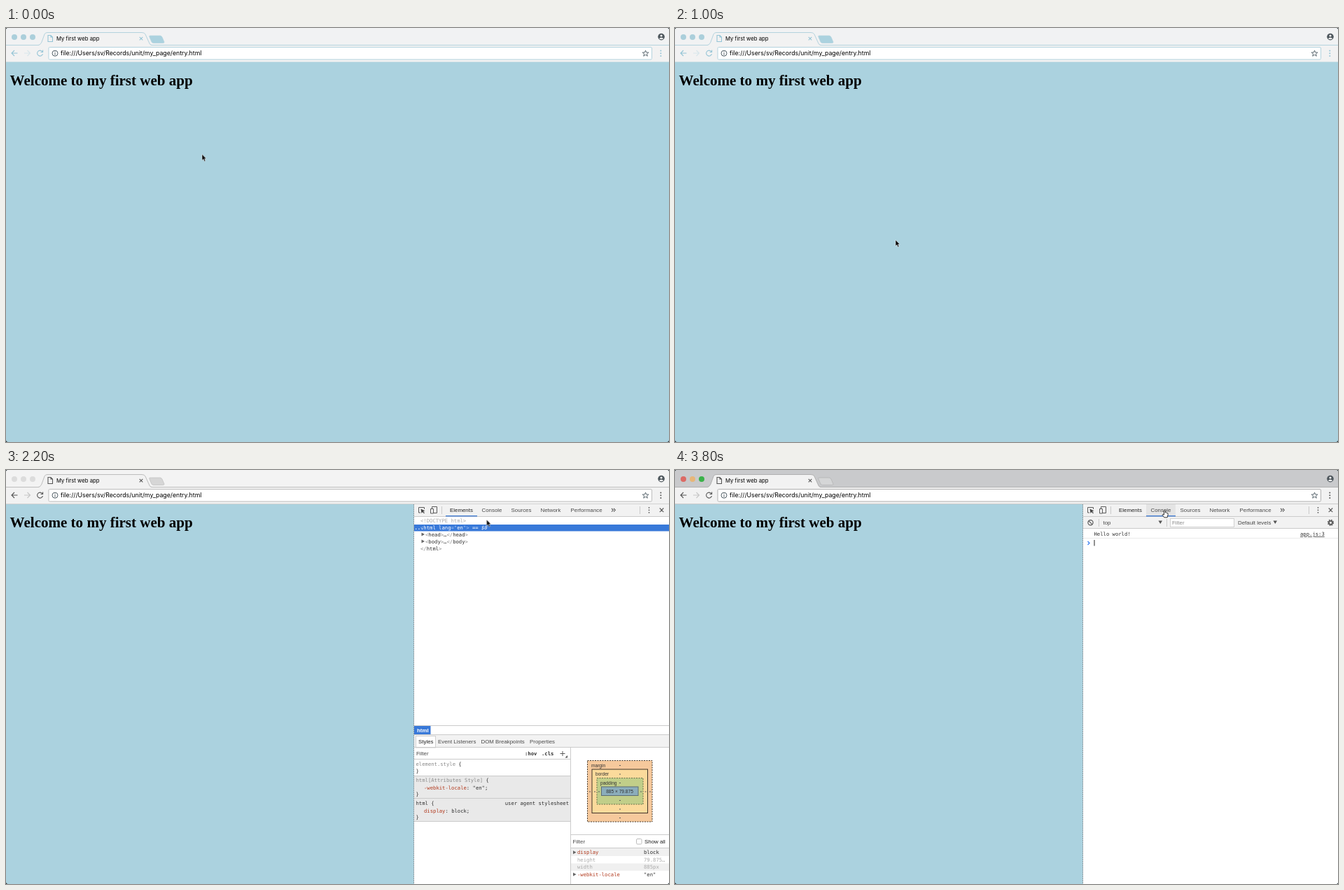
Animation of 947 by 592 pixels, one loop 4000 ms. Source, as an HTML page:

```html
<!DOCTYPE html>
<html lang="en">
<head>
<meta charset="utf-8">
<title>My first web app</title>
<style>
html, body { margin: 0; width: 100%; height: 100%; overflow: hidden; background: #111; }
svg { display: block; width: 947px; height: 592px; border-radius: 3px; }
text { white-space: pre; }
.ui { font-family: Inter, Roboto, sans-serif; }
.sans { font: 7.9px "Liberation Sans", Arial, sans-serif; fill: #4a4a4a; }
.mono { font: 7.23px "DejaVu Sans Mono", monospace; fill: #303030; }
.tiny { font: 6.6px "Liberation Sans", Arial, sans-serif; fill: #333; }
.h1 { font: bold 21.04px "Liberation Serif", Times, serif; }
.soft { fill: #8c8c8c; }
.faint { fill: #a9a9a9; }
.prop { fill: #b23a1e; }
.dark { fill: #222; }
.bold { font-weight: bold; }
.mid { text-anchor: middle; }
.end { text-anchor: end; }
.rule { stroke: #cbcbcb; fill: none; }
.line { fill: none; stroke: #5a5a5a; }
.icon { fill: none; stroke: var(--icon); stroke-width: 1.1; }

/* every change is a hard cut on a 200 ms grid: 5% of the loop */
#stage, .anim { animation: 4s step-end infinite; }
#stage { animation-name: theme; }
#menu { animation-name: menu; }
#pickA { animation-name: pickA; }
#pickB { animation-name: pickB; }
#tools { animation-name: tools; }
#overlay { animation-name: overlay; }
#elements { animation-name: elements; }
#console, #hand { animation-name: console; }
#caret { animation-name: caret; }
#arrow { animation-name: arrow; }

@keyframes theme {
  0%, 25% { --icon: #94c4d6; --edge: #b4d3de; --strip: #f1f2f3; --plus: #abd2df;
    --red: #abcfdb; --amber: #abcfdb; --green: #abcfdb; }
  10% { --icon: #4c6977; --edge: #b4d3de; --strip: #f1f2f3; --plus: #abd2df;
    --red: #abcfdb; --amber: #abcfdb; --green: #abcfdb; }
  30% { --icon: #555; --edge: #bdbdbd; --strip: #f3f3f3; --plus: #d6d6d6;
    --red: #dcdcdc; --amber: #dcdcdc; --green: #dcdcdc; }
  70%, 100% { --icon: #555; --edge: #b0b0b0; --strip: #c9cacc; --plus: #d5d6d7;
    --red: #dc6a64; --amber: #e7b679; --green: #3bb24a; }
}
@keyframes menu { 0%, 25%, 100% { opacity: 0 } 5% { opacity: 1 } }
@keyframes pickA { 0%, 15%, 100% { opacity: 0 } 10% { opacity: 1 } }
@keyframes pickB { 0%, 25%, 100% { opacity: 0 } 15% { opacity: 1 } }
@keyframes tools { 0% { opacity: 0 } 30%, 100% { opacity: 1 } }
@keyframes overlay { 0%, 40%, 100% { opacity: 0 } 30% { opacity: 1 } }
@keyframes elements { 0%, 75%, 100% { opacity: 0 } 30% { opacity: 1 } }
@keyframes console { 0% { opacity: 0 } 75%, 100% { opacity: 1 } }
@keyframes caret { 0% { opacity: 0 } 90%, 100% { opacity: 1 } }
@keyframes arrow {
  0% { transform: translate(280px, 180.5px) }
  10% { transform: translate(307px, 266px) }
  15% { transform: translate(313px, 302px) }
  20% { transform: translate(316px, 305px) }
  25% { transform: translate(315px, 303px) }
  35% { transform: translate(380px, 276px) }
  40% { transform: translate(560px, 180px) }
  45% { transform: translate(645px, 118px) }
  50% { transform: translate(680px, 84px) }
  55% { transform: translate(686.5px, 71px) }
  60% { transform: translate(695px, 60px) }
  65% { transform: translate(698.5px, 56.5px); opacity: 1 }
  75%, 100% { transform: translate(698.5px, 56.5px); opacity: 0 }
}
</style>
</head>
<body>
<svg id="stage" viewBox="0 0 947 592">
  <!-- page -->
  <rect width="947" height="592" fill="#abd2df"/>
  <text class="h1" x="5.6" y="82">Welcome to my first web app</text>

  <!-- browser frame -->
  <g class="ui">
    <rect width="947" height="25" fill="var(--strip)"/>
    <rect y="24" width="947" height="25" fill="#f2f2f2"/>
    <path d="M0 24.5H947" stroke="var(--edge)"/>
    <path d="M46 25C49 24 50 22 51 20L55 9Q56 6.5 59 6.5H194Q198 6.5 199 9L204 20Q205 24 208 25Z" fill="#f2f2f2"/>
    <path d="M46 24.5C49 24 50 22 51 20L55 9Q56 6.5 59 6.5H194Q198 6.5 199 9L204 20Q205 24 208 24.5" fill="none" stroke="var(--edge)"/>
    <path d="M206 11H220Q222 11 223 13L226 20Q226 21.500 224.500 21.500H211Q209 21.500 208 20L205 13Q204 11 206 11Z" fill="var(--plus)" stroke="var(--edge)" stroke-width=".7"/>
    <circle cx="12" cy="13" r="4" fill="var(--red)"/>
    <circle cx="25" cy="13" r="4" fill="var(--amber)"/>
    <circle cx="38" cy="13" r="4" fill="var(--green)"/>
    <path class="icon" d="M60 10.500H64L66.500 13V19.500H60ZM64 10.500V13H66.500" stroke-width=".9"/>
    <text x="72" y="17.800" font-size="7.76">My first web app</text>
    <path class="icon" d="M190.700 12.800L195.300 17.400M195.300 12.800L190.700 17.400"/>
    <circle cx="936" cy="12.600" r="4.800" fill="#4d565c"/>
    <circle cx="936" cy="11" r="1.600" fill="#f2f2f2"/>
    <path d="M932.800 15.200Q936 12.500 939.200 15.200Q936 17.500 932.800 15.200Z" fill="#f2f2f2"/>

    <path class="icon" d="M16.500 36H8M12 32L8 36L12 40"/>
    <path class="icon" d="M26 36H34.500M30.500 32L34.500 36L30.500 40" opacity=".28"/>
    <path class="icon" d="M51.800 33.600A4 4 0 1 0 52.500 37.200M52.600 31.500V34.500H49.600"/>
    <rect x="61" y="27.500" width="861.500" height="17.500" rx="1.500" fill="#fff" stroke="var(--edge)"/>
    <g fill="none" stroke="#4f5d65">
      <circle cx="70" cy="36.200" r="4"/>
      <path d="M70 35.500V38.600M70 33.600V34.600"/>
      <path d="M913.500 32L914.700 35H917.900L915.400 37L916.300 40.200L913.500 38.400L910.700 40.200L911.600 37L909.100 35H912.300Z" stroke-width=".9"/>
    </g>
    <text x="78" y="39.400" font-size="8.770">file:///Users/sv/Records/unit/my_page/entry.html</text>
    <g fill="var(--icon)">
      <circle cx="935.300" cy="32.400" r="1"/><circle cx="935.300" cy="36.200" r="1"/><circle cx="935.300" cy="40" r="1"/>
    </g>
    <path d="M0 48.500H947" stroke="var(--edge)" opacity=".6"/>
  </g>

  <!-- context menu -->
  <g id="menu" class="anim ui" font-size="8.800" fill="#25343c">
    <rect x="284" y="300" width="102" height="13.300" rx="3" fill="#6d8d99"/>
    <rect x="280" y="178.500" width="110" height="133.500" rx="3" fill="#f1f2f3"/>
    <path d="M280 222.500H390M280 280H390" stroke="#c0d9e2"/>
    <text x="294" y="190">Back</text>
    <text x="294" y="202.500" fill="#a3cadb">Forward</text>
    <text x="294" y="215">Reload</text>
    <text x="294" y="235.300">Save As...</text>
    <text x="294" y="247.800">Print...</text>
    <text x="294" y="260.300">Cast...</text>
    <text x="294" y="272.900">Translate to English</text>
    <text x="294" y="293.300">View Page Source</text>
    <text x="294" y="305.800">Inspect</text>
    <g id="pickA" class="anim" fill="#fff">
      <rect x="280" y="263.800" width="110" height="12.700" fill="#0b69dc"/>
      <text x="294" y="272.900">Translate to English</text>
    </g>
    <g id="pickB" class="anim" fill="#fff">
      <rect x="280" y="296.700" width="110" height="12.700" fill="#0b69dc"/>
      <text x="294" y="305.800">Inspect</text>
    </g>
  </g>

  <!-- element highlight -->
  <g id="overlay" class="anim">
    <rect y="49" width="582" height="52" fill="#6fa8dc" opacity=".66"/>
    <path d="M6 108L12 102.500L18 108Z" fill="#333b42"/>
    <rect x="1" y="107" width="79" height="16" rx="2" fill="#333b42"/>
    <path d="M28.500 110.500V119.500" stroke="#727a80"/>
    <text class="mono bold" x="6" y="117.300" style="fill:#e3a4a4">html</text>
    <text class="mono bold" x="33" y="117.300" style="fill:#f2f2f2">885<tspan dx="1.500">×</tspan><tspan dx="1.500">79.88</tspan></text>
  </g>

  <!-- inspector -->
  <g id="tools" class="anim">
    <rect x="583" y="49" width="364" height="543" fill="#fff"/>
    <path d="M582.500 49V592" stroke="#929a9e" stroke-dasharray="2 1"/>
    <rect x="583" y="49" width="364" height="17.500" fill="#f2f2f2"/>
    <path class="rule" d="M583 66.500H947M622.500 52V63M905.500 52V63"/>
    <path class="line" d="M592 61H589.500V53.500H597.500V56"/>
    <path d="M592.500 55.500L598.500 58.500L596 59.200L598 61.500L597 62.300L595 60L593.500 62Z" fill="#444"/>
    <path class="line" d="M608.500 55V52.500H615.500V61.500H611M606.500 55.500H610.500V62H606.500Z"/>
    <g id="console" class="anim">
      <rect x="673" y="49" width="42" height="17" fill="#e4e4e4"/>
      <rect x="673" y="65" width="42" height="1.500" fill="#4b82d4"/>
      <rect x="583" y="67" width="364" height="16.500" fill="#f2f2f2"/>
      <path class="rule" d="M583 83.500H947M605.500 70V81M702.500 70V81"/>
      <circle class="line" cx="593.500" cy="75.300" r="3.600" stroke-width="1.200"/>
      <path class="line" d="M591 72.800L596 77.800" stroke-width="1.200"/>
      <rect x="707.500" y="69.500" width="91" height="12" fill="#fff" stroke="#d0d0d0"/>
      <g class="sans">
        <text x="611.500" y="77.800">top</text>
        <text class="soft" x="710" y="78.200">Filter</text>
        <text x="804" y="77.800">Default levels</text>
      </g>
      <path d="M690.500 72.500H696L693.250 77ZM854.500 72.500H860L857.250 77Z" fill="#555"/>
      <circle class="line" cx="936.500" cy="75.300" r="3.700" stroke-width="1.800" stroke-dasharray="1.700 1.206"/>
      <circle class="line" cx="936.500" cy="75.300" r="2.500" stroke-width="1.800"/>
      <text class="mono" x="598.500" y="94.300">Hello world!</text>
      <text class="mono" x="893" y="94.300" text-decoration="underline">app.js:3</text>
      <path d="M583 97.500H947" stroke="#ebebeb"/>
      <path d="M589.500 102L592 104.500L589.500 107" fill="none" stroke="#367cf1" stroke-width="1.200"/>
      <rect id="caret" class="anim" x="598.500" y="100" width="1" height="8.500" fill="#222"/>
    </g>
    <g class="sans">
      <text class="dark" x="634" y="60">Elements</text>
      <text x="679.500" y="60">Console</text>
      <text x="721.500" y="60">Sources</text>
      <text x="763.500" y="60">Network</text>
      <text x="806.500" y="60">Performance</text>
    </g>
    <path class="line" d="M865 55L867.300 57.300L865 59.600M868 55L870.300 57.300L868 59.600M933.700 54.500L939.300 60.100M939.300 54.500L933.700 60.100" stroke-width="1.100"/>
    <path d="M918.500 53.800V61.500" stroke="#555" stroke-width="1.800" stroke-linecap="round" stroke-dasharray="0 3.500"/>

    <g id="elements" class="anim">
      <rect x="628" y="65" width="45" height="1.500" fill="#4b82d4"/>
      <!-- tree -->
      <rect x="583" y="78" width="364" height="9.500" fill="#3879d9"/>
      <path d="M593.500 89.500L598 92L593.500 94.500ZM593.500 99.500L598 102L593.500 104.500Z" fill="#666"/>
      <g class="mono">
        <text class="faint" x="592" y="75">&lt;!DOCTYPE html&gt;</text>
        <text x="583.500" y="84.800" style="fill:#fff" class="bold">...</text>
        <text x="592" y="84.800" style="fill:#fff"><tspan fill="#a6c5f2">&lt;</tspan>html lang<tspan fill="#a6c5f2">="</tspan>en<tspan fill="#a6c5f2">"&gt;</tspan> == <tspan font-style="italic">$0</tspan></text>
        <text x="599" y="94.600"><tspan class="soft">&lt;</tspan>head<tspan class="soft">&gt;</tspan>…<tspan class="soft">&lt;/</tspan>head<tspan class="soft">&gt;</tspan></text>
        <text x="599" y="104.500"><tspan class="soft">&lt;</tspan>body<tspan class="soft">&gt;</tspan>…<tspan class="soft">&lt;/</tspan>body<tspan class="soft">&gt;</tspan></text>
        <text x="592" y="114.500"><tspan class="soft">&lt;/</tspan>html<tspan class="soft">&gt;</tspan></text>
      </g>
      <!-- breadcrumb and tabs -->
      <rect x="583" y="366" width="23.500" height="12.500" fill="#3879d9"/>
      <rect x="583" y="379" width="364" height="17.500" fill="#f2f2f2"/>
      <rect x="585.500" y="380.500" width="28" height="16.500" fill="#fff" stroke="#d0d0d0"/>
      <path class="rule" d="M583 365.500H947M583 378.500H947M583 396.500H947"/>
      <g class="sans">
        <text x="587" y="375" class="bold" style="fill:#fff">html</text>
        <text class="dark" x="589" y="390.700">Styles</text>
        <text x="617" y="390.700">Event Listeners</text>
        <text x="678.500" y="390.700">DOM Breakpoints</text>
        <text x="748" y="390.700">Properties</text>
        <text x="586" y="408">Filter</text>
      </g>
      <!-- rules -->
      <rect x="583" y="437.500" width="223" height="65" fill="#e9e9e9"/>
      <path class="rule" d="M583 413.500H806M583 437.500H806M583 469.500H806M583 502.500H806M806.500 397V592"/>
      <path class="line" d="M791.500 405.500H798.500M795 402V409"/>
      <path d="M802 408V411.500H798.500Z" fill="#555"/>
      <g class="mono">
        <text class="bold" x="741" y="408">:hov</text>
        <text class="bold" x="765" y="408">.cls</text>
        <text x="585.500" y="422.500"><tspan class="soft">element.style</tspan> {</text>
        <text x="585.500" y="432.500">}</text>
        <text x="585.500" y="446"><tspan class="soft">html[Attributes Style]</tspan> {</text>
        <text x="597" y="456.500"><tspan class="prop">-webkit-locale</tspan>: "en";</text>
        <text x="585.500" y="465.500">}</text>
        <text x="585.500" y="479">html {</text>
        <text class="end" x="804" y="479">user agent stylesheet</text>
        <text x="597" y="489.500"><tspan class="prop">display</tspan>: block;</text>
        <text x="585.500" y="498.500">}</text>
      </g>
      <!-- box model -->
      <g stroke="#40362a">
        <rect x="830.500" y="415.500" width="92.500" height="87.500" fill="#f6c99c" stroke-dasharray="2 1.500"/>
        <rect x="837" y="428" width="79.500" height="62.500" fill="#fbda9b"/>
        <rect x="844" y="440.500" width="66" height="37.500" fill="#c1ce89" stroke="#66704a" stroke-dasharray="2 1.500"/>
        <rect x="850.500" y="453" width="52.500" height="12.500" fill="#8badbb" stroke="#5c6c75"/>
      </g>
      <g class="tiny">
        <text x="836" y="424.500">margin</text>
        <text x="842" y="437">border</text>
        <text x="849" y="449.500">padding</text>
        <text class="mid" x="876.500" y="462">885 × 79.875</text>
      </g>
      <path class="line" d="M876 422.500h2M876 435h2M876 447.500h2M876 472.500h2M876 485h2M876 497.500h2M833 460h2M840 460h2M846 460h2M906 460h2M912.500 460h2M919 460h2"/>
      <!-- computed -->
      <path class="rule" d="M807 521.500H947M807 540.500H947"/>
      <rect x="807" y="541" width="140" height="11" fill="#f0f0f0"/>
      <rect x="807" y="562.500" width="140" height="10.500" fill="#f0f0f0"/>
      <rect x="900.500" y="527.500" width="7.500" height="7.500" rx="1.500" fill="#fff" stroke="#bbb"/>
      <path d="M810 544.300L814.500 546.800L810 549.300ZM810 575.800L814.500 578.300L810 580.800Z" fill="#666"/>
      <g class="sans">
        <text x="809.500" y="533.700">Filter</text>
        <text class="dark" x="912" y="533.700">Show all</text>
      </g>
      <g class="mono">
        <text class="prop" x="816" y="549.300">display</text><text x="911" y="549.300">block</text>
        <text class="faint" x="816" y="559.800">height</text><text class="faint" x="911" y="559.800">79.875…</text>
        <text class="faint" x="816" y="570.300">width</text><text class="faint" x="911" y="570.300">885px</text>
        <text class="prop" x="816" y="580.800">-webkit-locale</text><text x="911" y="580.800">"en"</text>
      </g>
    </g>
  </g>

  <!-- pointers -->
  <path id="arrow" class="anim" d="M0 0V8.800L2 7L3.400 10.200L5 9.500L3.600 6.500H6.200Z" fill="#0c0c0c" stroke="#fff" stroke-width=".5"/>
  <path id="hand" class="anim" d="M698.500 63V58Q699.400 56.500 700.300 58V61Q702 60.200 702.300 61.500Q704.500 61 704.200 63.500L703.200 67.800H698.800L696 64.200Q696.400 62.500 698.500 64Z" fill="#fff" stroke="#222" stroke-width=".9" stroke-linejoin="round"/>
</svg>
</body>
</html>
```
